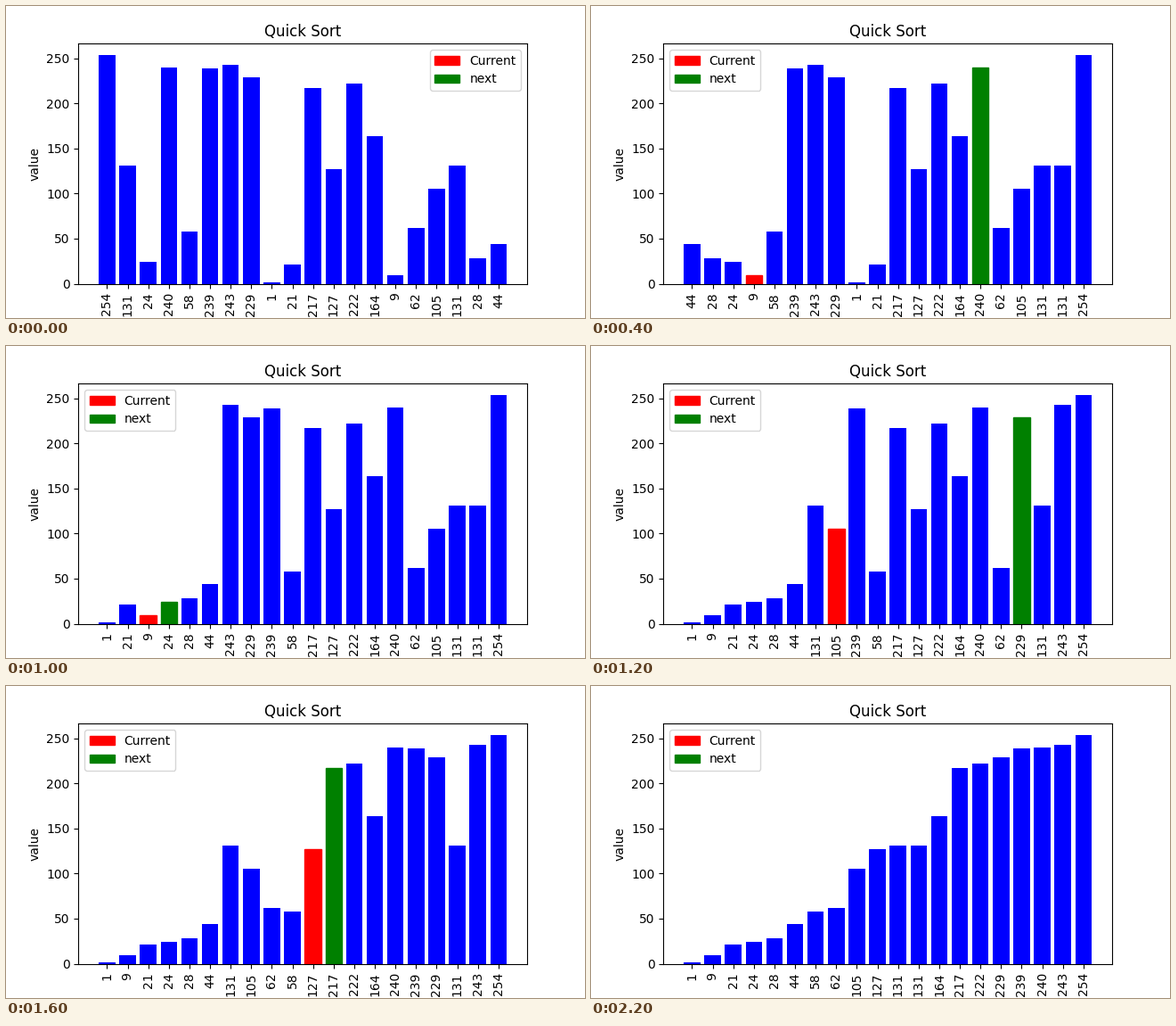
Animation of 650 by 350 pixels, one loop 3000 ms. Source, as a matplotlib script:

```python
import matplotlib.pyplot as plt
from matplotlib.animation import FuncAnimation
from matplotlib.patches import Patch

VALUES = [254, 131, 24, 240, 58, 239, 243, 229, 1, 21,
          217, 127, 222, 164, 9, 62, 105, 131, 28, 44]
INTERVAL = 200
FRAMES = 15


def quick_sort(a, lo, hi):
    """Yield (values, current, next) after each exchange in a partition."""
    if lo >= hi:
        return
    pivot, i, j = a[lo], lo + 1, hi
    while True:
        while i <= j and a[i] <= pivot:
            i += 1
        while i <= j and a[j] >= pivot:
            j -= 1
        if i > j:
            break
        a[i], a[j] = a[j], a[i]
        yield a[:], i, j
    a[lo], a[j] = a[j], a[lo]
    yield from quick_sort(a, lo, j - 1)
    yield from quick_sort(a, j + 1, hi)


def build_steps():
    data = VALUES[:]
    steps = [(VALUES, None, None)]
    steps += quick_sort(data, 0, len(data) - 1)
    steps += [(data, 0, 1), (data, None, None)]
    return steps


steps = build_steps()
handles = [Patch(color="red", label="Current"),
           Patch(color="green", label="next")]

fig, ax = plt.subplots(figsize=(6.5, 3.5), dpi=100)


def draw(k):
    values, current, following = steps[min(k, len(steps) - 1)]
    ax.clear()
    bars = ax.bar(range(len(values)), values, color="blue")
    if current is not None:
        bars[current].set_color("red")
        bars[following].set_color("green")
    ax.set_xticks(range(len(values)), [str(v) for v in values], rotation=90)
    ax.set_ylabel("value")
    ax.set_title("Quick Sort")
    ax.legend(handles=handles, loc="upper right" if k < 2 else "upper left")
    return []


anim = FuncAnimation(fig, draw, frames=FRAMES, init_func=lambda: draw(0),
                     interval=INTERVAL, repeat=True, repeat_delay=0)
plt.show()
```
